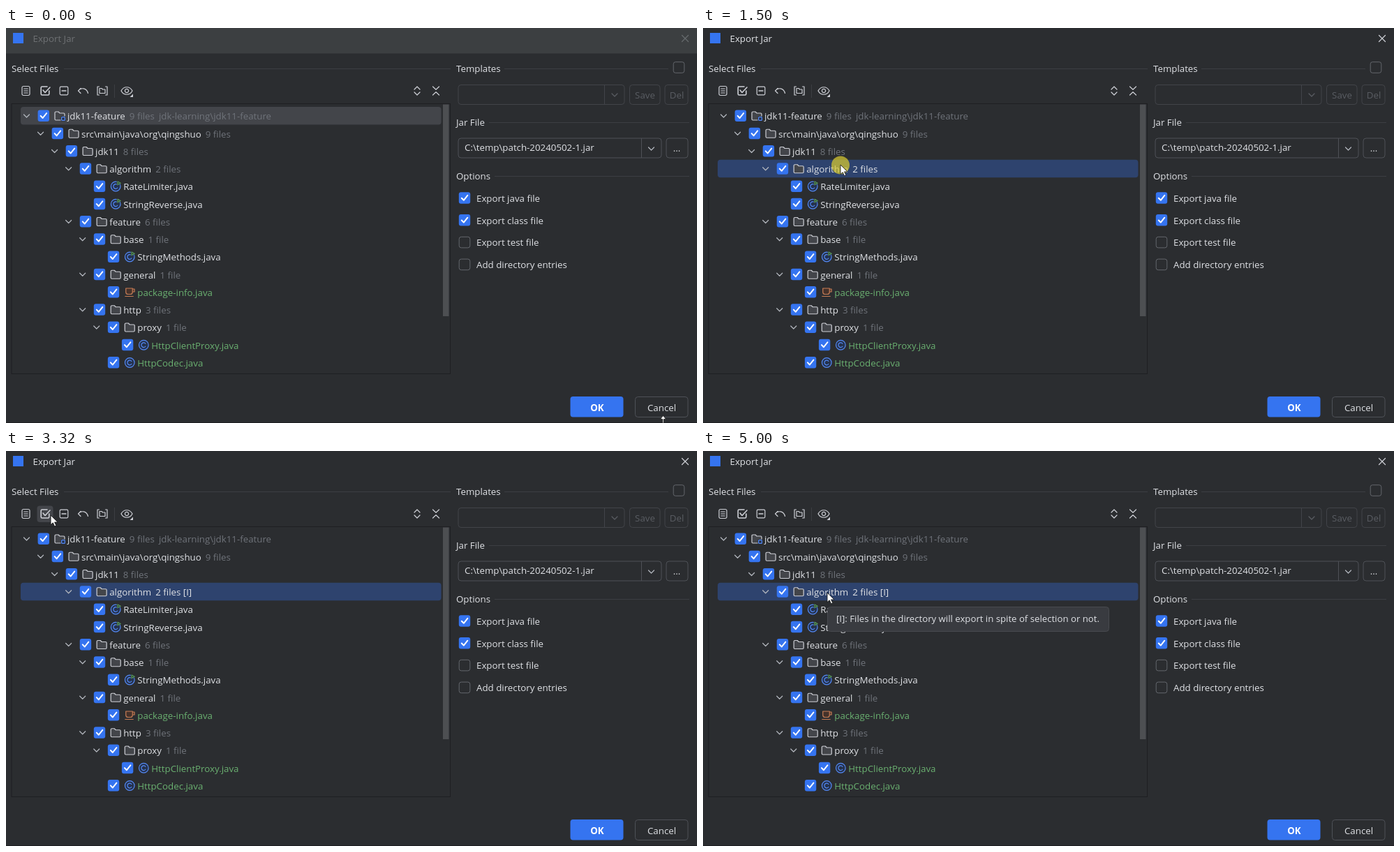
Animation of 990 by 566 pixels, one loop 8000 ms. Source, as an HTML page:

```html
<!DOCTYPE html>
<html lang="en">
<head>
<meta charset="utf-8">
<title>Export Jar</title>
<style>
  html, body { margin: 0; height: 100%; overflow: hidden; background: #2b2d30; }
  svg { display: block; width: 990px; height: 566px; }
  text { font: 13.3px "Open Sans", "Noto Sans", sans-serif; fill: #dfe1e5; white-space: pre; }
  .mid { text-anchor: middle; }
  .gray { fill: #6f737a; }
  .green { fill: #6ab070; }
  .off { fill: #5a5d63; }
  .line { fill: none; stroke: #ced0d6; stroke-width: 1.2; stroke-linecap: round; stroke-linejoin: round; }
  .rule { fill: none; stroke: #3c3e43; }
  .box { fill: none; stroke: #4e5157; }
  .faint { fill: none; stroke: #424449; }
</style>
</head>
<body>
<svg id="stage" viewBox="0 0 990 566"></svg>
<script>
const ROW = 25.25, TOP = 126, INDENT = 20.05;
const BUTTONS = [28.5, 56, 83, 110.5, 138, 173];

const text = (x, y, s, cls = '') => `<text x="${x}" y="${y}" class="${cls}">${s}</text>`;
const path = (d, cls = 'line', extra = '') => `<path d="${d}" class="${cls}" ${extra}/>`;
const box = (x, y, w, h, cls = 'box', r = 4, extra = '') =>
  `<rect x="${x}" y="${y}" width="${w}" height="${h}" rx="${r}" class="${cls}" ${extra}/>`;
const at = (x, y, body, extra = '') => `<g transform="translate(${x} ${y})" ${extra}>${body}</g>`;
const chevron = (x, y, color = '#b4b8bf') => at(x, y, path('M-4 -2L0 2L4 -2', 'line', `style="stroke:${color}"`));

const checkbox = (x, y, on) => at(x, y, on
  ? box(-8.2, -8.2, 16.4, 16.4, '', 3, 'fill="#3574f0"') +
    path('M-4.2 .2L-1.2 3.3L4.3 -3.6', 'line', 'style="stroke:#fff;stroke-width:2"')
  : box(-7.8, -7.8, 15.6, 15.6, 'box', 3, 'style="stroke:#63666c"'));

const folder = path('M-7 -4.5Q-7 -6 -5.5 -6H-2L0 -4H5.5Q7 -4 7 -2.5V4.5Q7 6 5.5 6H-5.5Q-7 6 -7 4.5Z',
  'line', 'style="fill:#43454a"');
const classIcon = '<circle r="6.8" fill="#25324d" stroke="#548af7" stroke-width="1.2"/>' +
  path('M2.6 -2A3.3 3.3 0 1 0 2.6 2', 'line', 'style="stroke:#548af7"');
const icons = {
  module: folder + box(1.5, .5, 7, 7, '', 1, 'fill="#2b2d30"') +
    box(2.6, 1.6, 4.8, 4.8, '', 1, 'fill="#25324d" stroke="#548af7" stroke-width="1.2"'),
  dir: folder,
  cls: classIcon,
  main: classIcon + path('M1.5 -8.5V-1L8.5 -4.7Z', '', 'fill="#2b2d30"') +
    path('M2.8 -7V-2.6L7 -4.8Z', 'line', 'style="stroke:#57965c;fill:#253627"'),
  cup: path('M-5.5 -5.5H4V0Q4 3 1 3H-2.5Q-5.5 3 -5.5 0ZM4 -4.5H6.8V-.5H4M-6.5 6H5', 'line',
    'style="stroke:#c77d55;fill:#45322b"'),
};

// depth, icon, name, file count, location
const rows = [
  [0, 'module', 'jdk11-feature', '9 files', 'jdk-learning\\jdk11-feature'],
  [1, 'dir', 'src\\main\\java\\org\\qingshuo', '9 files'],
  [2, 'dir', 'jdk11', '8 files'],
  [3, 'dir', 'algorithm', '2 files'],
  [4, 'main', 'RateLimiter.java'],
  [4, 'main', 'StringReverse.java'],
  [3, 'dir', 'feature', '6 files'],
  [4, 'dir', 'base', '1 file'],
  [5, 'main', 'StringMethods.java'],
  [4, 'dir', 'general', '1 file'],
  [5, 'cup', 'package-info.java'],
  [4, 'dir', 'http', '3 files'],
  [5, 'dir', 'proxy', '1 file'],
  [6, 'cls', 'HttpClientProxy.java'],
  [5, 'cls', 'HttpCodec.java'],
];

const drawRow = ([depth, icon, name, count, place], i) => {
  const y = TOP + i * ROW, x = depth * INDENT;
  const span = s => s ? `<tspan dx="6" class="gray">${s}</tspan>` : '';
  return (count ? chevron(29.5 + x, y) : '') + checkbox(53.8 + x, y - .3, true) +
    at(77 + x, y, icons[icon]) +
    text(88 + x, y + 5.3, name + span(count) + span(place), i == 10 || i > 12 ? 'green' : '');
};

const toolbar =
  at(28.5, 90, box(-5.5, -6.5, 11, 13, 'line', 2) + path('M-2.7 -3H2.7M-2.7 0H2.7M-2.7 3H2.7')) +
  at(56, 90, path('M5.8 0V4.5Q5.8 6 4.3 6H-4.3Q-5.8 6 -5.8 4.5V-4.5Q-5.8 -6 -4.3 -6H3M-3 -1L0 2.5L7 -5',
    'line', 'style="stroke-width:1.6"')) +
  at(83, 90, box(-5.8, -5.8, 11.6, 11.6, 'line', 1.5) + path('M-2.8 0H2.8', 'line', 'style="stroke-width:1.7"')) +
  at(110.5, 90, path('M-3.5 -3.5L-7 0L-3.5 3.5M-7 0C-3 -5 5 -4.5 7 3.5')) +
  at(138, 90, path('M-4.5 -6H-7V6H-4.5M4.5 -6H7V6H4.5M-4 3.5V-3.5H-1L.5 -2H4V3.5Z')) +
  path('M155.5 81V100', 'rule') +
  at(173, 90, path('M-8 0C-4.5 -7 4.5 -7 8 0C4.5 7 -4.5 7 -8 0Z') + '<circle r="2.6" class="line"/>' +
    path('M9 4.5V9H4.5Z', '', 'fill="#ced0d6"')) +
  at(589, 90, path('M-4 -2L0 -6L4 -2M-4 2L0 6L4 2')) +
  at(616, 90, path('M-4.5 -6L0 -1.8L4.5 -6M-4.5 6L0 1.8L4.5 6'));

const options = ['java file', 'class file', 'test file'].map(s => 'Export ' + s)
  .concat('Add directory entries')
  .map((s, i) => checkbox(657, 243.5 + i * 31.8, i < 2) + text(674, 249 + i * 31.7, s)).join('');

document.getElementById('stage').innerHTML = `
  <rect width="990" height="566" fill="#2b2d30"/>
  <rect id="bar" width="990" height="36.5" fill="#3c3f41"/>
  <rect x="10" y="7" width="15" height="15" fill="#3574f0"/>
  <g id="caption">${text(38.5, 19.5, 'Export Jar')}${path('M968.5 10.5L977.5 19.5M977.5 10.5L968.5 19.5')}</g>
  ${text(8, 62.5, 'Select Files')}${text(645, 62.5, 'Templates')}
  ${text(645, 140, 'Jar File')}${text(645, 217, 'Options')}
  ${path('M83 58.5H637M714 58.5H949M692 135.5H979M700 212.5H979', 'rule')}
  ${box(0, 78.5, 23, 23.5, '', 4, 'id="hover" fill="#43454a"')}
  ${toolbar}
  ${box(8, 108.5, 628.5, 387, '', 0, 'fill="none" stroke="#1e1f22"')}
  ${box(626, 109.5, 8.5, 303.5, '', 0, 'fill="#4d4f52"')}
  ${box(21, 0, 602.5, 25.3, '', 4, 'id="selection"')}
  <g id="tree">${rows.map(drawRow).join('')}</g>
  ${checkbox(964, 56.5)}
  ${box(648, 81.5, 238, 28, 'faint')}${path('M857.5 82V109', 'faint')}${chevron(872, 96, '#5a5d63')}
  ${box(893.5, 81.5, 43.5, 28, 'faint')}${text(915.5, 100.5, 'Save', 'mid off')}
  ${box(944, 81.5, 33, 28, 'faint')}${text(961, 100.5, 'Del', 'mid off')}
  ${box(648, 158, 291, 28)}${path('M910.5 158V186', 'box')}${chevron(924.5, 173)}
  ${text(657, 176.3, 'C:\\temp\\patch-20240502-1.jar')}
  ${box(946, 158, 31, 28)}${text(961, 177, '...', 'mid')}
  ${options}
  ${box(808.5, 528, 76, 29.5, '', 4, 'fill="#3574f0"')}
  ${text(847, 548.5, 'OK', 'mid" style="font-weight:700;fill:#fff')}
  ${box(901.5, 528.5, 75.5, 29)}${text(939.5, 548.5, 'Cancel', 'mid')}
  ${path('M0 565.5H990', '', 'stroke="#1e1f22"')}
  <g id="tip">${box(178.5, 223.5, 403, 35, '', 4, 'fill="#393b40" stroke="#484a4f"')}
    ${text(191, 245.3, '[I]: Files in the directory will export in spite of selection or not.',
      '" style="font-size:13.2px')}</g>
  <circle id="halo" r="13" fill="#d8cb32" opacity=".72"/>
  ${path('M0 0V13.6L3.2 10.7L5.5 15.8L7.8 14.8L5.5 9.9H10Z', '', 'id="arrow" fill="#fff" stroke="#111" stroke-width=".8"')}
  ${path('M941.5 555.5L937.5 560.5H940.7V566H942.3V560.5H945.5Z', '', 'id="resize" fill="#fff" stroke="#111" stroke-width=".7"')}`;

const el = id => document.getElementById(id);
const [bar, caption, hover, selection, tip, halo, arrow, resize] =
  ['bar', 'caption', 'hover', 'selection', 'tip', 'halo', 'arrow', 'resize'].map(el);
const count = el('tree').querySelectorAll('text')[3].querySelector('tspan');

// Pointer moves: first step, last step, steps, bend x/y, end x/y
const moves = [
  [70, 820, 12, 420, 270, 216, 191],
  [890, 1240, 6, 203, 192, 197, 196],
  [1890, 2650, 12, 110, 109, 78, 96],
  [2720, 2790, 2, 63, 92, 52, 89],
  [3250, 3920, 10, 76, 90, 162, 158],
  [3990, 4400, 7, 174, 185, 178, 203],
];

function pointer(t) {
  let x = 941, y = 562;
  for (const [start, end, steps, bx, by, ex, ey] of moves) {
    if (t < start) break;
    const step = Math.floor((t - start) / (end - start) * (steps - 1) + .15) + 1;
    const p = Math.min(1, step / steps), q = 1 - p;
    x = q * q * x + 2 * p * q * bx + p * p * ex;
    y = q * q * y + 2 * p * q * by + p * p * ey;
  }
  return [x, y];
}

const show = (node, on) => node.setAttribute('visibility', on ? 'visible' : 'hidden');
const place = (node, x, y) => node.setAttribute('transform', `translate(${x} ${y})`);

function draw() {
  const t = performance.now() % 8000;
  const [x, y] = pointer(t);
  const active = t >= 1500, included = t >= 3250;

  show(bar, !active);
  caption.setAttribute('opacity', active ? 1 : .3);
  selection.setAttribute('y', TOP - 12.9 + (active ? 3 * ROW : 0));
  selection.setAttribute('fill', active ? '#2e436e' : '#43454a');
  count.textContent = included ? '2 files [I]' : '2 files';
  count.setAttribute('class', active ? '' : 'gray');

  const button = y > 78 && y < 102 && BUTTONS.find(b => Math.abs(x - b) < 11.5);
  show(hover, button);
  if (button) hover.setAttribute('x', button - 11.5);

  show(halo, t >= 1500 && t < 1630 || t >= 3120 && t < 3250);
  place(halo, x, y + .5);
  show(arrow, t >= 70);
  show(resize, t < 70);
  place(arrow, x, y);
  tip.setAttribute('opacity', t < 4930 ? 0 : t < 5000 ? .5 : 1);
  requestAnimationFrame(draw);
}
draw();
</script>
</body>
</html>
```
